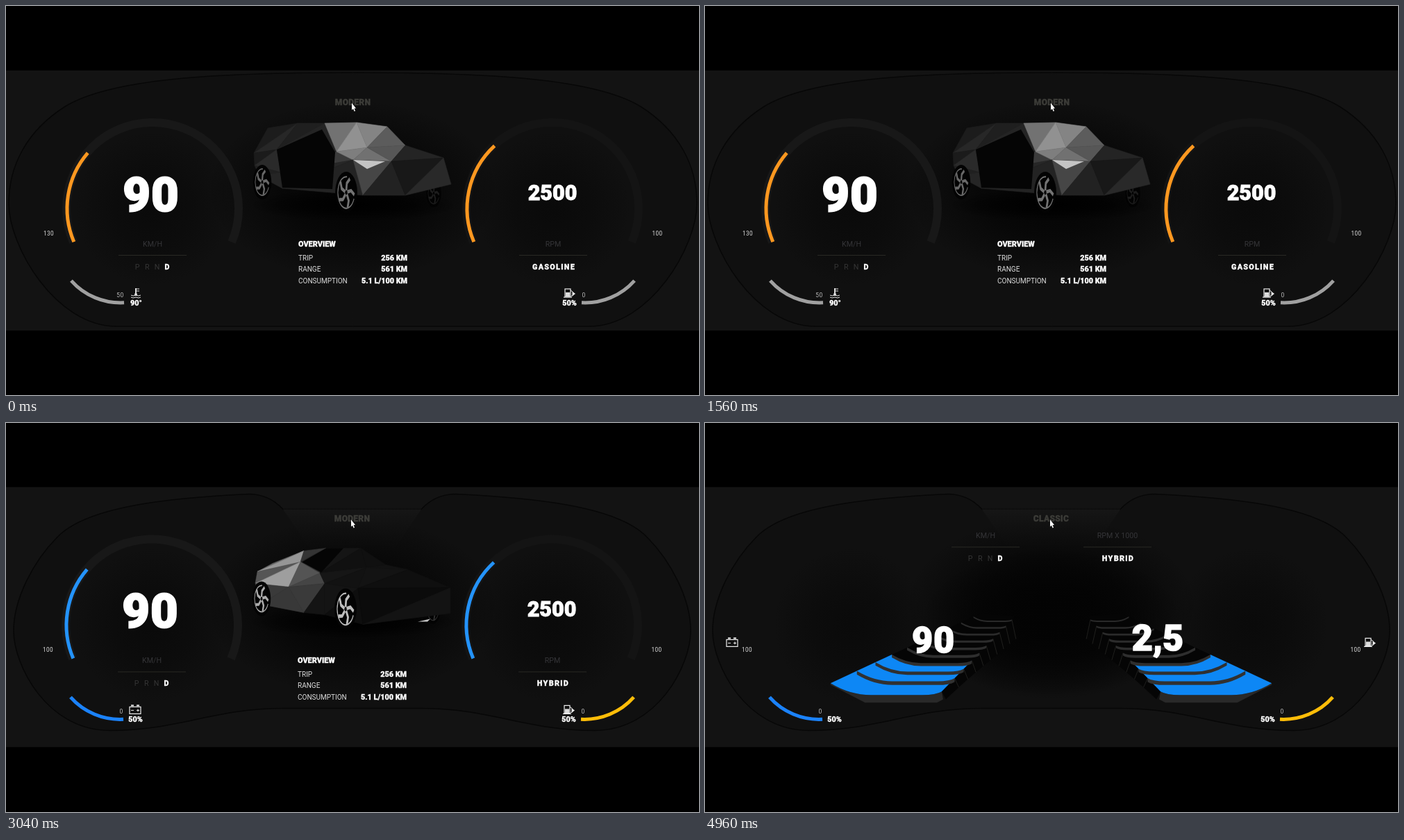
Recreate the animation shown at these times as an HTML page with a canvas. Size 998x561 px, loop 5 s.

```html
<!DOCTYPE html>
<html lang="en">
<head>
<meta charset="utf-8">
<title>Instrument cluster</title>
<style>
html, body { margin: 0; width: 100%; height: 100%; overflow: hidden; background: #000 }
canvas { display: block }
</style>
</head>
<body>
<canvas id="stage" width="998" height="561"></canvas>
<script>
const c = document.getElementById('stage').getContext('2d');
const LOOP = 5000, CUT = 2840, MID = 499.5, TAU = Math.PI * 2;
const clamp = (v, lo = 0, hi = 1) => Math.max(lo, Math.min(hi, v));
const noise = n => Math.abs(Math.sin(n * 127.1) * 43758.5) % 1;
const grey = v => `rgb(${v},${v},${v})`;
const polar = (r, a) => [r * Math.cos(a), r * Math.sin(a)];

// Each body is a mesh between four lines: roof, belt, bonnet edge, sill.
const suv = {
  lines: [
    [[377, 176], [420, 169], [459, 169], [505, 168], [549, 174]],
    [[357, 212], [390, 207], [476, 210], [520, 204], [575, 201]],
    [[358, 230], [396, 240], [500, 222], [555, 224], [630, 219]],
    [[365, 245], [398, 263], [514, 273], [575, 273], [641, 257]]
  ],
  light: [505, 190], reach: 46, base: 34, power: 120, rim: 115,
  glass: [[390, 207], [455, 178], [474, 211], [470, 264], [398, 262]],
  lamp: [[500, 222], [546, 224], [520, 235]]
};
const coupe = {
  lines: [
    [[385, 203], [430, 185], [462, 181], [512, 181], [548, 205]],
    [[363, 215], [425, 201], [453, 217], [520, 209], [580, 212]],
    [[360, 232], [408, 237], [460, 232], [508, 239], [641, 238]],
    [[368, 262], [430, 274], [460, 277], [515, 291], [641, 275]]
  ],
  light: [405, 211], reach: 42, base: 16, power: 125, rim: 190,
  glass: [[427, 201], [462, 181], [487, 181], [455, 216]],
  lamp: [[594, 287], [612, 283], [608, 287]]
};

const themes = [
  { name: 'GASOLINE', main: '#ff9820', tread: '#ff8f14', left: '#a0a0a0', right: '#a0a0a0',
    max: '130', min: '50', level: '90°', icon: thermometer, car: suv },
  { name: 'HYBRID', main: '#2493fb', tread: '#0d87f5', left: '#1b82fa', right: '#ffbd08',
    max: '100', min: '0', level: '50%', icon: battery, car: coupe }
];

function path(points, fill) {
  c.beginPath();
  points.forEach(p => c.lineTo(...p));
  c.closePath();
  c.fillStyle = fill;
  c.fill();
}
function text(s, x, y, size, color = '#fff', weight = 400, align = 'center', gap = 0) {
  c.font = `${weight} ${size}px Roboto, sans-serif`;
  c.letterSpacing = gap + 'px';
  c.textAlign = align;
  c.fillStyle = c.strokeStyle = color;
  c.fillText(s, x, y);
  if (weight === 900) {
    c.lineWidth = size * .03;
    c.strokeText(s, x, y);
  }
}
function line(color, width, ...pts) {
  c.beginPath();
  pts.forEach(p => c.lineTo(...p));
  c.strokeStyle = color;
  c.lineWidth = width;
  c.stroke();
}
function arc(x, y, r, from, to, color, width) {
  c.beginPath();
  c.arc(x, y, r, from, to);
  c.strokeStyle = color;
  c.lineWidth = width;
  c.stroke();
}
function disc(x, y, r, fill) {
  c.beginPath();
  c.arc(x, y, r, 0, TAU);
  c.fillStyle = fill;
  c.fill();
}
function at(x, y, draw, sx = 1, sy = 1) {
  c.save();
  c.translate(x, y);
  c.scale(sx, sy);
  draw();
  c.restore();
}
function glow(x, y, rx, ry, v) {
  const g = c.createRadialGradient(0, 0, 0, 0, 0, 1);
  [1, .65, 0].forEach((a, i) => g.addColorStop(i / 2, `rgba(${v},${v},${v},${a})`));
  at(x, y, () => {
    c.fillStyle = g;
    c.fillRect(-1, -1, 2, 2);
  }, rx, ry);
}
// Draws the left half, then its mirror image.
function both(draw) {
  draw();
  at(2 * MID, 0, draw, -1);
}

const outlines = [
  'M499.5 96C300 96 150 105 85 145C30 180 4 230 4 285C4 345 70 462 160 462H499.5',
  'M499.5 125H400Q380 103 350 103C250 108 120 118 75 165C40 200 12 255 12 300C12 350 60 444 150 444C250 444 300 412 400 412H499.5'
].map(d => new Path2D(d));

function background(kind) {
  c.fillStyle = '#131313';
  c.fillRect(-2, 93, 1002, 375);
  both(() => {
    c.fillStyle = '#101010';
    c.fill(outlines[kind]);
    c.strokeStyle = '#070707';
    c.lineWidth = 1.5;
    c.stroke(outlines[kind]);
  });
  both(() => glow(211, 292, 112, 112, 10));
  glow(MID, 265, 210, 130, 3);
  if (kind) {
    const g = c.createLinearGradient(0, 125, 0, 190);
    g.addColorStop(0, '#161616');
    g.addColorStop(1, 'rgba(12,12,12,0)');
    path([[400, 125], [599, 125], [555, 190], [444, 190]], g);
  }
}

function thermometer() {
  line('#ddd', 2, [0, -7], [0, 3]);
  for (const y of [-6, -3]) line('#ddd', 1, [0, y], [5, y]);
  disc(0, 2, 2, '#ddd');
  for (const y of [3, 6]) line('#ddd', 1, [-7, y], [-4, y + 1], [0, y], [4, y + 1], [7, y]);
}
function battery() {
  c.strokeStyle = '#eee';
  c.lineWidth = 1.2;
  c.strokeRect(-8, -4, 16, 10);
  for (const x of [-4, 4]) {
    line('#eee', 2, [x - 2, -6], [x + 2, -6]);
    line('#eee', 1, [x - 2, 1], [x + 2, 1]);
  }
  line('#eee', 1, [4, -1], [4, 3]);
}
function pump() {
  c.strokeStyle = '#eee';
  c.lineWidth = 1.2;
  c.strokeRect(-6, -6, 8, 11);
  c.fillStyle = '#ddd';
  c.fillRect(-5, -1, 6, 6);
  line('#eee', 1.2, [-8, 6], [4, 6]);
  line('#eee', 1, [2, -4], [5, -2], [5, 4], [3, 4]);
  path([[5, -2], [9, 1], [5, 4]], '#eee');
}

function wheel(x, y, r, shade) {
  at(x, y, () => {
    disc(0, 0, 1, '#030303');
    arc(0, 0, .76, .4, 4.8, shade, .07);
    for (let i = 0; i < 5; i++) {
      const a = i * TAU / 5 - .3;
      line(shade, .17, polar(.1, a), polar(.45, a + .1), polar(.74, a + .45));
    }
  }, r * .53, r);
}
// Every mesh cell becomes two triangles, shaded by distance to the light.
function drawCar({ lines, light, reach, base, power, rim, glass, lamp }) {
  glow(500, 287, 150, 24, 0);
  wheel(616, 270, 20, grey(rim * .25));
  let n = 0;
  const facet = tri => {
    const [dx, dy] = light.map((v, k) => tri.reduce((sum, p) => sum + p[k] / 3, 0) - v);
    const lit = power * Math.exp(-(dx * dx + dy * dy) / reach ** 2);
    const shade = grey(Math.round((base + lit) * (.65 + .6 * noise(++n))));
    path(tri, shade);
    line(shade, .6, ...tri, tri[0]);
  };
  for (let r = 0; r < 3; r++) {
    for (let i = 0; i < 4; i++) {
      const [a, b, d, e] = [lines[r][i], lines[r][i + 1], lines[r + 1][i], lines[r + 1][i + 1]];
      facet([a, b, d]);
      facet([b, e, d]);
    }
  }
  path(glass, '#050505');
  path(lamp, '#c4c4c4');
  wheel(369, 254, 25, grey(rim * .9));
  wheel(490, 269, 30, grey(rim));
}

function panel(x, y, label, drawValue) {
  at(x, y, () => {
    text(label, 0, -12, 10.7, '#353538');
    line('#292924', 1, [-49, .5], [49, .5]);
    drawValue();
  });
}
function panels(gearX, engineX, y, label, name) {
  panel(gearX, y, 'KM/H', () => [...'PRND'].forEach((g, i) =>
    text(g, -22 + 14.3 * i, 21, 10.7, g === 'D' ? '#fff' : '#353535', g === 'D' ? 900 : 400)));
  panel(engineX, y, label, () => text(name, 1, 21, 10.8, '#fff', 900, 'center', 1.3));
}

function modern(th) {
  const start = Math.PI - .402, end = TAU + .402;
  for (const [x, to, track] of [[211, 3.852, '#181818'], [787, 3.967, '#141414']]) {
    arc(x, 292, 124, start, end, track, 12);
    arc(x, 292, 123, start, to, th.main, 5);
  }
  text('90', 209, 296, 68.5, '#fff', 900, 'center', 1);
  text('2500', 787, 280, 30.5, '#fff', 900);
  panels(211, 788, 359, 'RPM', th.name);
  at(187, 414, th.icon);
  at(811, 414, pump);
  drawCar(th.car);
  text('OVERVIEW', 421, 347, 10.9, '#fff', 900, 'left');
  [['TRIP', '256 KM'], ['RANGE', '561 KM'], ['CONSUMPTION', '5.1 L/100 KM']].forEach(([k, v], i) => {
    const y = 366.5 + 16.5 * i;
    text(k, 421, y, 10, '#ddd', 400, 'left');
    text(v, 578, y, 10.8, '#fff', 900, 'right');
  });
}

// Staircase in perspective; rise 0..1 lifts it.
function stairs(th, rise) {
  const vx = 496, vy = 229 - 4 * rise;
  const L = [182 - 19 * rise, 376 - 14 * rise], R = [342 - 14 * rise, 388 - 13 * rise];
  const dip = 393 - 12 * rise;
  const steps = [...Array(10).keys()];
  const scale = i => 1 - .655 * (i / 9) ** .77;
  const project = ([x, y], s, dy = 0) => [vx + (x - vx) * s, vy + (y - vy) * s + dy];
  const foot = i => {
    const [x, y] = project(R, scale(i));
    return [x + 6, y + 11 + 12 * rise + (17 + 25 * rise) * i / 9];
  };
  // Curved front edge at depth s, closed along the given far points.
  const slab = (s, dy, fill, ...rest) => {
    const on = (x, y = dip) => project([x, y], s, dy);
    c.beginPath();
    c.moveTo(...on(...L));
    c.quadraticCurveTo(...on(L[0] + 28), ...on(L[0] + 58));
    c.lineTo(...on(R[0] - 28));
    c.quadraticCurveTo(...on(R[0] - 8), ...on(...R));
    rest.forEach(p => c.lineTo(...p));
    c.fillStyle = fill;
    c.fill();
  };
  path([...steps.map(i => project(R, scale(i))), ...steps.map(foot).reverse()], '#050505');
  steps.slice(1).forEach(i => line('rgba(70,70,66,.4)', 1, project(R, scale(i)), foot(i)));

  const floor = 404 - 6 * rise;
  slab(1, 0, '#292929', [344 - 7 * rise, 399 - rise], [335, floor],
    [232 - 60 * rise, floor], [182 - 35 * rise, 378 + 20 * rise]);
  for (const i of steps) {
    const s = scale(i), back = scale(Math.min(i + 1, 9.5));
    if (i) slab(s, 6 * s, grey(50 - i), project(R, s), project(L, s));
    slab(s, 0, i < 3 ? th.tread : '#050505', project(R, back), project(L, back));
  }
}
function classic(th, rise) {
  glow(MID, 290, 190, 110, 3);
  layer(c.globalAlpha * rise, () => glow(MID, 278, 62, 22, 13));
  both(() => stairs(th, rise));
  text('90', 330, 332 - 10 * rise, 52, '#fff', 900, 'center', .8);
  text('2,5', 653, 329 - 10 * rise, 52, '#fff', 900);
  panels(405, 595, 179, 'RPM X 1000', th.name);
  at(40, 317, th.icon);
  at(958, 317, pump);
}

function common(th, title) {
  text(title, MID, 143, 12, '#3c3c38', 900, 'center', .3);
  text(th.max, 61.5, 330.5, 8.2, '#ddd', 400, 'center', .4);
  text('100', 938, 330.5, 8.2, '#ddd', 400, 'center', .4);
  text(th.min, 169.5, 419.5, 8.5, '#bbb', 400, 'right', .3);
  text('0', 832, 419.5, 8.5, '#bbb');
  text(th.level, 187.5, 432, 10.8, '#fff', 900);
  text('50%', 811.5, 432, 10.8, '#fff', 900);
  const gauge = color => arc(165, 333, 95, 1.518, 2.416, color, 5);
  gauge(th.left);
  at(2 * MID, 0, () => gauge(th.right), -1);
  path([[498, 140], [498, 150], [500, 148.3], [501.6, 152], [503, 151.3], [501.5, 147.8], [504, 147.5]], '#fff');
}

function layer(alpha, draw) {
  if (alpha <= 0) return;
  c.save();
  c.globalAlpha = alpha;
  draw();
  c.restore();
}
function frame() {
  const t = performance.now() % LOOP;
  const kind = t < CUT ? 0 : 1;
  const local = t - CUT * kind, th = themes[kind];
  const out = 1 - clamp((local - 1690) / 150), into = clamp((local - 1840) / 160);
  const rise = clamp((local - 2120) / 120, -.9, 1);
  c.fillStyle = '#000';
  c.fillRect(0, 0, 998, 561);
  at(-kind, -.6 * kind, () => {
    background(kind);
    layer(out, () => modern(th));
    layer(into, () => classic(th, rise));
    common(th, local < 1840 ? 'MODERN' : 'CLASSIC');
  });
  requestAnimationFrame(frame);
}
frame();
</script>
</body>
</html>
```
